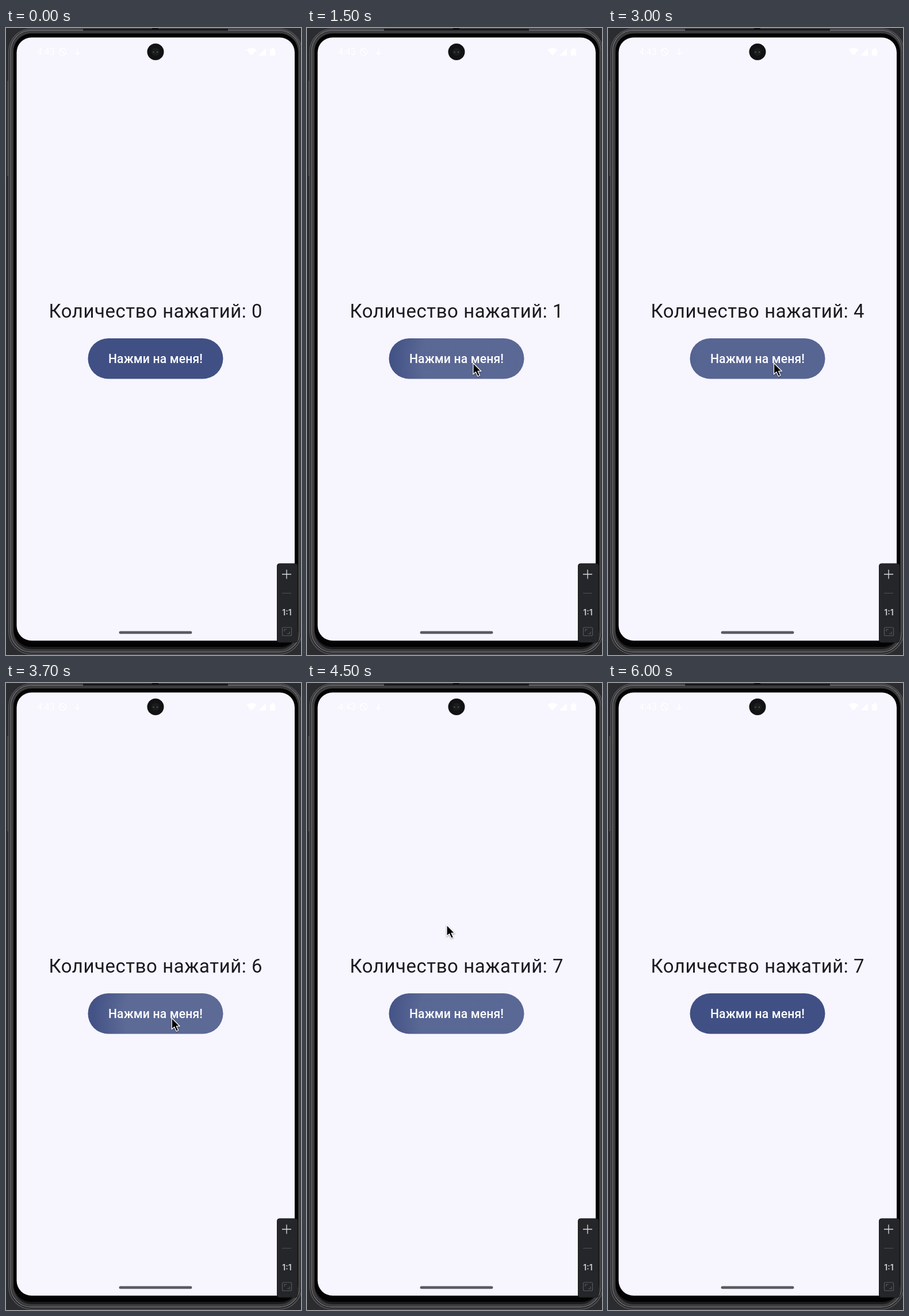
Write an HTML page that moves like this. It is 513x1091 px and loops after 6200 ms.

```html
<!DOCTYPE html>
<html lang="ru">
<head>
<meta charset="utf-8">
<title>Счётчик нажатий</title>
<style>
  html, body { margin: 0; width: 100%; height: 100%; overflow: hidden; background: #2a2c30; }
  svg { display: block; width: 513px; height: 1091px; font-family: Roboto, sans-serif; }
</style>
</head>
<body>
<svg viewBox="0 0 513 1091">
  <defs>
    <radialGradient id="glow">
      <stop offset=".6" stop-color="#fff"/>
      <stop offset="1" stop-color="#fff" stop-opacity="0"/>
    </radialGradient>
    <clipPath id="pill"><rect x="142.500" y="540" width="235" height="70.500" rx="35.250"/></clipPath>
  </defs>

  <!-- Phone body: nested outlines from the metal rim to the black bezel -->
  <rect width="513" height="1091" fill="#2a2c30"/>
  <rect x="2" y="92" width="4" height="166" fill="#454548"/>
  <g fill="none">
    <rect x="5" y="1.500" width="509" height="1088" rx="39" fill="#1c1c1e" stroke="#505053" stroke-width="2"/>
    <rect x="8" y="4" width="503" height="1082" rx="36" stroke="#77777a" stroke-width="1.500"/>
    <rect x="11" y="7" width="498" height="1076" rx="34" stroke="#3c3b3e" stroke-width="4"/>
    <rect x="13" y="10" width="495" height="1067" rx="31" fill="#030303"/>
  </g>
  <path d="M134 3H386" stroke="#111113" stroke-width="3"/>
  <path d="M254 1.500H265" stroke="#111113" stroke-width="4"/>
  <rect x="18.500" y="16.500" width="483.500" height="1049.500" rx="26" fill="#f7f5fe"/>

  <!-- Status bar -->
  <g fill="#fff">
    <text x="54" y="47" font-size="16">4:43</text>
    <path d="M418 38Q427 31 436 38L427 48Z"/>
    <path d="M452 35V48H439Z"/>
    <path d="M459 37H462V35H466V37H468V48H459Z"/>
  </g>
  <g fill="none" stroke="#fff" stroke-width="1.500">
    <circle cx="98.500" cy="41.500" r="6"/>
    <path d="M94 37L103 46M124 36V47M120 42L124 46L128 42"/>
  </g>
  <circle cx="260" cy="41.500" r="14.500" fill="#111214"/>
  <circle cx="260" cy="41.500" r="7" fill="#1b1c1e"/>
  <path d="M255.500 42h2M262 42h2" stroke="#555" stroke-width="2"/>

  <!-- Counter and button -->
  <text id="counter" x="260.300" y="504" font-size="32.900" letter-spacing=".5875" text-anchor="middle" fill="#1a1b20"></text>
  <g clip-path="url(#pill)">
    <rect x="142" y="539" width="236" height="73" fill="#405084"/>
    <g id="ripples"></g>
  </g>
  <text x="260" y="582.500" font-size="21.150" font-weight="500" letter-spacing=".1175" text-anchor="middle" fill="#fff">Нажми на меня!</text>
  <rect x="196.500" y="1049.500" width="127" height="4.800" rx="2.400" fill="#5b5a60"/>

  <!-- Zoom panel -->
  <rect x="471.500" y="932" width="35.500" height="137" rx="4" fill="#25262a" stroke="#1b1c1f"/>
  <path d="M480 950.500H496M488 942.500V958.500" stroke="#dedfe3" stroke-width="1.300"/>
  <path d="M480 983.500H496" stroke="#505156"/>
  <text x="488.500" y="1022" font-family="Inter, sans-serif" font-size="14" font-weight="600" text-anchor="middle" fill="#cfd0d5">1:1</text>
  <g fill="none" stroke="#57585d" stroke-width="1.200">
    <rect x="480.500" y="1043" width="16" height="14.500" rx="2"/>
    <path d="M484 1050V1046.500H488M489 1054H493V1050.500"/>
  </g>

  <path id="cursor" d="M0 0V19.500L4.500 15.500L8 23L11.500 21.500L8.200 14.200H14Z" fill="#000" stroke="#fff" stroke-width="1.300" stroke-linejoin="round" style="filter:drop-shadow(0 1px 1px #0006)"/>
</svg>
<script>
const LOOP = 6200, STEP = 100, RELEASE_DELAY = 90;
const presses = [1280, 1790, 2270, 2660, 3080, 3500, 4270];

// Cursor stops: time, x, y
const path = [
  [100, 18, 612], [300, 145, 606], [500, 248, 592], [700, 289, 582],
  [1000, 289, 582], [1300, 289, 583], [4400, 288, 583],
  [4500, 243, 421], [4700, 130, 165], [4900, 30, 15]
];
const byId = id => document.getElementById(id);
const counter = byId('counter'), cursor = byId('cursor');
const clamp = v => Math.max(0, Math.min(1, v));

const ripples = presses.map(() => {
  const circle = document.createElementNS('http://www.w3.org/2000/svg', 'circle');
  circle.setAttribute('cx', 290);
  circle.setAttribute('cy', 580);
  circle.setAttribute('fill', 'url(#glow)');
  return byId('ripples').appendChild(circle);
});

function drawRipple(circle, age) {
  const fadeIn = clamp(age / 75), fadeOut = clamp((675 - age) / 375);
  circle.setAttribute('r', 15 + 0.62 * Math.max(0, age));
  circle.setAttribute('opacity', 0.136 * fadeIn * fadeOut);
}

function drawCursor(time) {
  const next = path.findIndex(stop => stop[0] >= time);
  const visible = next >= 0 && time >= path[0][0];
  cursor.setAttribute('visibility', visible ? 'visible' : 'hidden');
  if (!visible) return;
  const [t1, x1, y1] = path[next], [t0, x0, y0] = path[Math.max(0, next - 1)];
  const k = t1 > t0 ? (time - t0) / (t1 - t0) : 1;
  cursor.setAttribute('transform', `translate(${x0 + (x1 - x0) * k} ${y0 + (y1 - y0) * k})`);
}

function render() {
  const time = Math.floor(performance.now() % LOOP / STEP) * STEP;
  const count = presses.filter(press => press + RELEASE_DELAY <= time).length;
  counter.textContent = `Количество нажатий: ${count}`;
  ripples.forEach((circle, i) => drawRipple(circle, time - presses[i]));
  drawCursor(time);
  requestAnimationFrame(render);
}
render();
</script>
</body>
</html>
```
